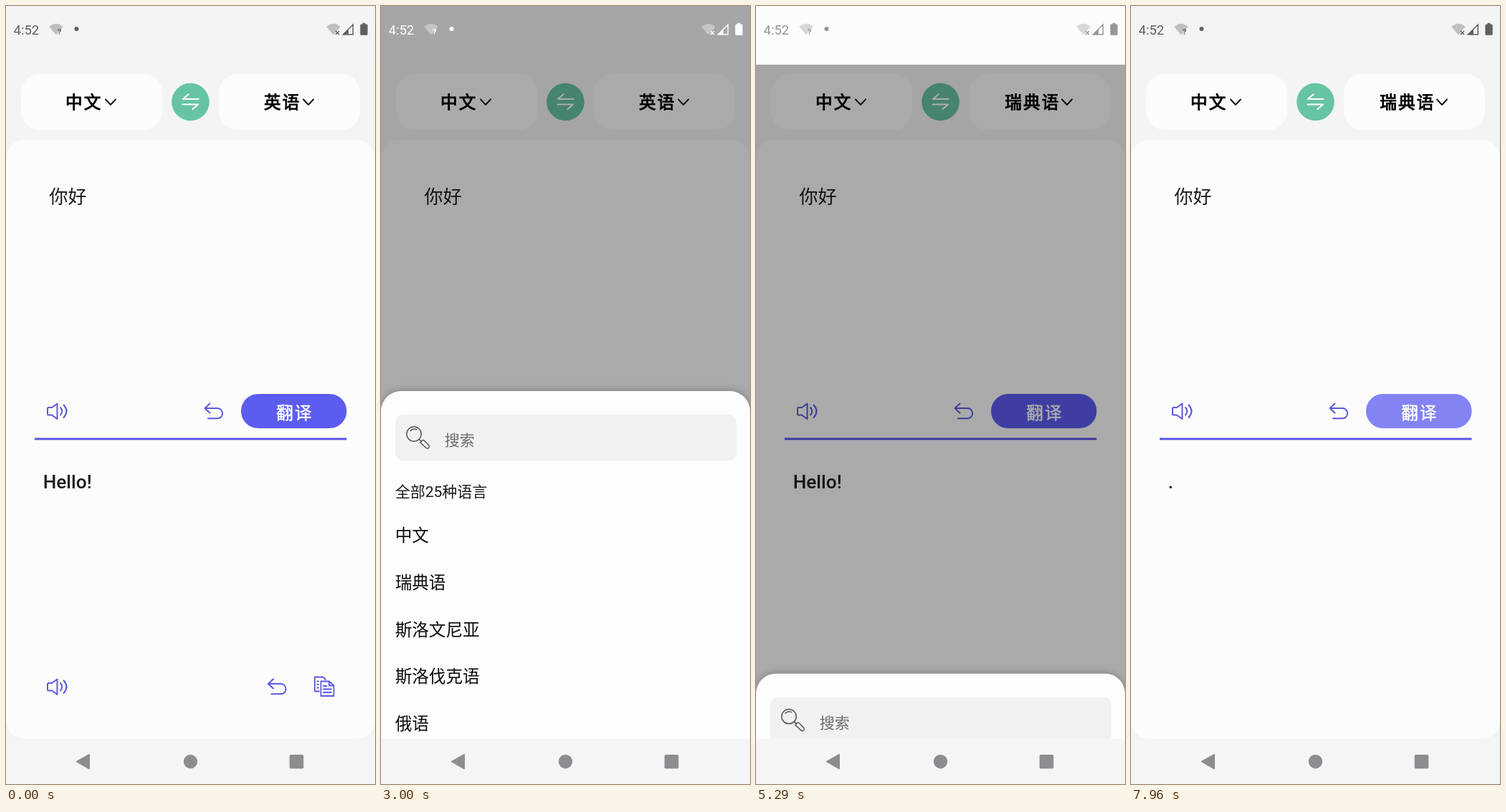
Animation, 515 px wide and 1087 px high, one loop 8 s. Source, as an HTML page:

```html
<!DOCTYPE html>
<html lang="zh">
<head>
<meta charset="utf-8">
<title>翻译</title>
<style>
  html, body { margin: 0; width: 100%; height: 100%; overflow: hidden; background: #f4f4f6; }
  svg { display: block; width: 100%; height: 100%; }
  text { font-family: Roboto, "Noto Sans CJK SC", "Noto Sans CJK", sans-serif; }
  .line { fill: none; stroke-linecap: round; stroke-linejoin: round; }
  .icon { stroke: #5b59dc; stroke-width: 2; }
  .chev { stroke: #111; stroke-width: 1.9; }
  .title { font-size: 23.6px; letter-spacing: .0893em; stroke: #000; stroke-width: .9px; }
  .item { font-size: 23.6px; fill: #0c0c0c; }
</style>
</head>
<body>
<svg viewBox="0 0 515 1087" preserveAspectRatio="none">
  <defs>
    <g id="speaker" class="line icon">
      <path d="M58 562.5Q58 561 59.5 561H64L71.5 555.5V577L64 571.5H59.5Q58 571.5 58 570Z"/>
      <path d="M76 561Q80.5 566 76 571.5M80.5 557.5Q88.5 566 80.5 575"/>
    </g>
    <path id="undo" class="line icon" d="M284.5 555.5L277.5 562L284.5 568.5M277.5 562H295A7 7 0 0 1 295 576.3H282"/>
    <path id="chevron" class="line chev" d="M0 130.5L7 138L14 130.5"/>
    <path id="fan" d="M0 16L-9.8 4.5Q0 -4 9.8 4.5Z" fill="currentColor" opacity=".36"/>
    <filter id="soft" x="-10%" y="-10%" width="120%" height="120%"><feGaussianBlur stdDeviation="6"/></filter>
  </defs>

  <rect width="515" height="1087" fill="#f4f4f6"/>
  <rect x="21" y="95" width="197" height="78" rx="26" fill="#fcfcfd"/>
  <rect x="297" y="95" width="197" height="78" rx="26" fill="#fcfcfd"/>
  <rect id="cardPress" x="297" y="95" width="197" height="78" rx="26"/>
  <text class="title" x="83" y="143">中文</text>
  <use href="#chevron" x="139"/>
  <text class="title" id="lang" y="143"></text>
  <use href="#chevron" id="langChev"/>
  <circle cx="257.5" cy="134" r="26.3" fill="#67c4a2"/>
  <path class="line" d="M268.5 130H247L254.5 123.5M246.5 137.5H268L260.5 144" stroke="#fff" stroke-width="2.2"/>

  <rect y="187" width="515" height="837" rx="26" fill="#fcfcfd"/>
  <text x="60.3" y="275.5" font-size="26.2" fill="#1c1c1e">你好</text>
  <rect id="cursor" x="113" y="247" width="2.8" height="35" fill="#5c08dc"/>
  <use href="#speaker"/>
  <use href="#undo"/>
  <rect id="button" x="328" y="542" width="147.5" height="48" rx="24" fill="#5c5cf0"/>
  <rect id="buttonPress" x="328" y="542" width="147.5" height="48" rx="24" fill="#fff"/>
  <text x="377.3" y="577" font-size="23.6" letter-spacing="2.1" fill="#fff" stroke="#fff" stroke-width=".5">翻译</text>
  <rect x="40" y="603.4" width="435.5" height="3" fill="#5b55ea"/>
  <text id="result" x="51.7" y="674" font-size="26.2" font-weight="500" fill="#1c1c1e"></text>
  <g id="tools">
    <use href="#speaker" y="385"/>
    <use href="#undo" x="88.5" y="385"/>
    <g class="line icon" style="stroke-width:1.8">
      <path d="M437 957.5H431V937.5H442.5L446 941M434.5 943.5H436M434.5 948H436M434.5 952.5H436"/>
      <path d="M439.5 943.5H451L457.5 949.5V964H439.5ZM451 943.5V949.5H457.5M443 950H447.5M443 954.5H454M443 959H454"/>
    </g>
  </g>

  <rect id="scrim" y="82" width="515" height="942"/>
  <rect id="statusBg" width="515" height="82"/>

  <g id="sheet">
    <rect width="515" height="1100" rx="28" filter="url(#soft)" opacity=".28"/>
    <rect width="515" height="1100" rx="28" fill="#fdfdfd"/>
    <rect x="20" y="33" width="476" height="64.5" rx="11" fill="#eff1f3"/>
    <g class="line" stroke="#55585c" stroke-width="1.5">
      <circle cx="46" cy="60" r="10.2"/>
      <path d="M41 55.5Q45 51.5 49.5 54M53.5 67.5L56.5 70.5M55 71.5L57.5 69Q59 68 60.3 69.3L66.5 75.5Q68 77.5 66.8 79.3Q65 81 63 79.5L56 73Q54.5 72.5 55 71.5Z"/>
    </g>
    <text x="88.7" y="76" font-size="21" fill="#696b6e">搜索</text>
    <text x="19.7" y="147.7" font-size="21" fill="#1a1a1c">全部25种语言</text>
    <g id="list"></g>
  </g>

  <g id="status">
    <text x="10.5" y="39.5" font-size="18.5" fill="currentColor">4:52</text>
    <use href="#fan" x="70" y="24.5"/>
    <text x="71.8" y="39.5" font-size="11.5" font-weight="700" fill="currentColor">?</text>
    <circle cx="98.5" cy="32" r="3" fill="currentColor"/>
    <use href="#fan" x="457" y="24.5"/>
    <path d="M460 35L465 40M465 35L460 40" stroke="currentColor" stroke-width="1.5"/>
    <path d="M470.5 39.7H484.3V26Z" fill="none" stroke="currentColor" stroke-width="1.5"/>
    <path d="M470 40.3L478 32V40.3Z" fill="currentColor"/>
    <path d="M497.5 25.5V23.7H501.5V25.5H503.3Q504.7 25.5 504.7 27V39.3Q504.7 40.8 503.3 40.8H495.9Q494.4 40.8 494.4 39.3V27Q494.4 25.5 495.9 25.5Z" fill="currentColor"/>
  </g>

  <g fill="#8d8d91">
    <rect y="1024" width="515" height="63" fill="#f5f5f7"/>
    <path d="M99 1055.7L116 1046V1065.4Z" stroke="#8d8d91" stroke-width="2" stroke-linejoin="round"/>
    <circle cx="257.5" cy="1055.7" r="9.7"/>
    <rect x="395.7" y="1046" width="19.6" height="19.6" rx="1.8"/>
  </g>
</svg>

<script>
const LOOP = 8000;
const OPEN = 1527, CLOSE = 5211, DISMISS = 5440, PRESS = 7840;
const HALF_Y = 538, FULL_Y = 82, HIDDEN_Y = 1087;
const LIGHT = [244, 244, 246], DIM = [165, 165, 168], BRIGHT = [252, 252, 253];
const WHITE = [255, 255, 255], DARK = [96, 96, 99];

const languages = ['中文', '瑞典语', '斯洛文尼亚', '斯洛伐克语', '俄语', '罗马尼亚语',
  '葡萄牙语', '波兰语', '荷兰语', '拉脱维亚语', '立陶宛语', '日语'];

const $ = id => document.getElementById(id);
const set = (id, attrs) => {
  for (const key in attrs) $(id).setAttribute(key, attrs[key]);
};
const span = (t, start, length) => Math.min(1, Math.max(0, (t - start) / length));
const mix = (a, b, k) => a + (b - a) * k;
const color = (a, b, k) => `rgb(${a.map((v, i) => Math.round(mix(v, b[i], k)))})`;
const smooth = p => (1 - Math.cos(Math.PI * p)) / 2;
const settle = p => 1 - (1 - p) ** 5;

$('list').innerHTML = languages
  .map((name, i) => `<text class="item" x="19.7" y="${210 + 65.8 * i}">${name}</text>`)
  .join('');

function sheetY(t) {
  if (t < 2500) return HALF_Y + 205 * (1 - smooth(span(t, OPEN, 125)));
  if (t < CLOSE) return mix(HALF_Y, FULL_Y, smooth(span(t, 3100, 600)));
  return mix(FULL_Y, HIDDEN_Y, settle(span(t, CLOSE, 256)));
}

function cursorOn(t) {
  if (t < 4500) return t > 80 && (t - 80) % 510 < 255;
  return t > 5740 && t < 7700 && (t - 5740) % 520 < 260;
}

function statusFill(t) {
  if (t < CLOSE) return color(LIGHT, DIM, span(t, OPEN, 90));
  if (t < DISMISS) return color(DIM, BRIGHT, span(t, CLOSE, 70));
  return color(BRIGHT, LIGHT, span(t, DISMISS, 120));
}

function statusInk(t) {
  return t < CLOSE
    ? color(DARK, WHITE, span(t, OPEN, 60))
    : color(WHITE, DARK, span(t, 5250, 62));
}

function render(t) {
  const entered = smooth(span(t, OPEN, 125));
  const waiting = t >= 7920;
  const swedish = t >= CLOSE;

  set('sheet', {
    transform: `translate(0 ${sheetY(t).toFixed(2)})`,
    opacity: Math.min(1, entered * 1.1),
    visibility: t > OPEN && t < CLOSE + 256 ? 'visible' : 'hidden'
  });
  set('scrim', { opacity: 0.325 * entered * (1 - span(t, DISMISS, 120)) });
  set('statusBg', { fill: statusFill(t) });
  $('status').style.color = statusInk(t);

  set('cardPress', { opacity: 0.045 * span(t, 1440, 60) * (1 - span(t, 1660, 140)) });
  set('cursor', { visibility: cursorOn(t) ? 'visible' : 'hidden' });

  $('lang').textContent = swedish ? '瑞典语' : '英语';
  set('lang', { x: swedish ? 347.3 : 360 });
  set('langChev', { x: swedish ? 427 : 415 });

  set('buttonPress', { opacity: 0.24 * span(t, PRESS - 10, 90) });
  $('result').textContent = waiting ? '.' : 'Hello!';
  set('tools', { visibility: waiting ? 'hidden' : 'visible' });
}

const start = performance.now();
function tick() {
  render((performance.now() - start) % LOOP);
  requestAnimationFrame(tick);
}
tick();
</script>
</body>
</html>
```
